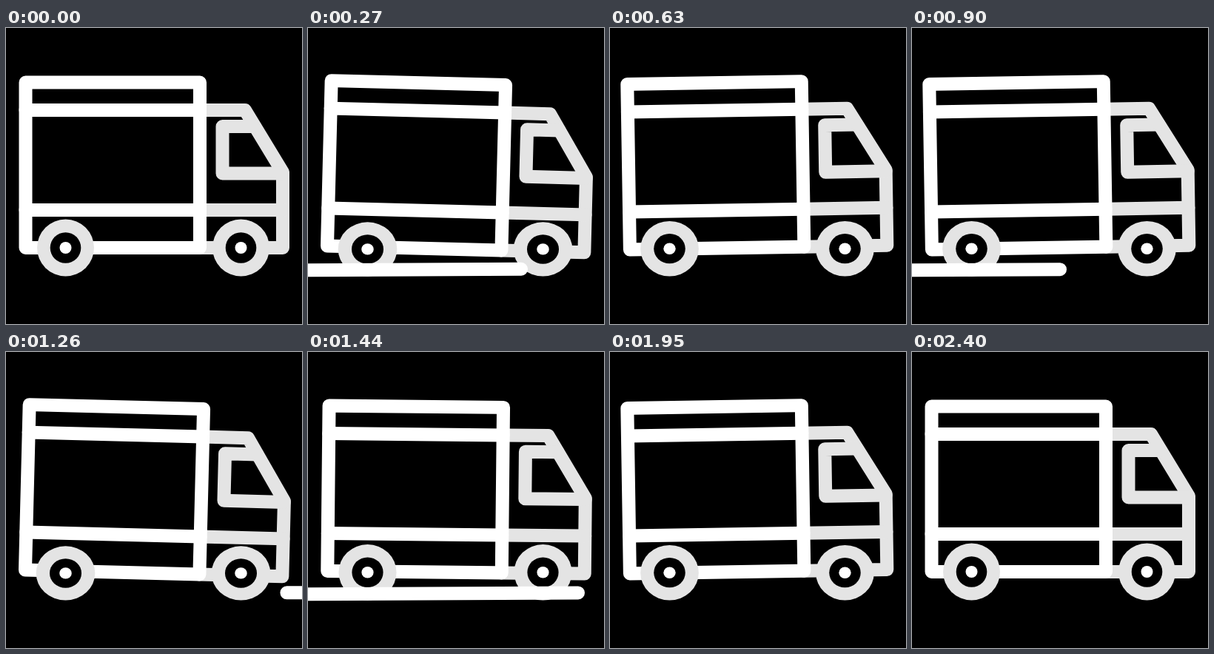
An HTML page with a canvas for the animation above (2430 ms loop, 400x400 px).

```html
<!DOCTYPE html>
<html lang="en">
<head>
<meta charset="utf-8">
<title>Delivery truck</title>
<style>
  html, body { margin: 0; width: 100%; height: 100%; overflow: hidden; background: #000; }
  canvas { display: block; width: 100vmin; height: 100vmin; }
</style>
</head>
<body>
<canvas id="stage" width="400" height="400"></canvas>
<script>
const ctx = document.getElementById('stage').getContext('2d');
const LOOP = 2430, STEP = 30;
const WHITE = '#fff', GREY = '#e4e4e4', BLACK = '#000';
const TILT = 1.45;
const SWING_START = 270, SWING = 495, SWING_END = SWING_START + 3 * SWING;
const LINE_PERIOD = 600, LINE_COUNT = 3;

const progress = (t, from, to) => Math.min(1, Math.max(0, (t - from) / (to - from)));
const ease = (t, from, to) => {
  const u = progress(t, from, to);
  return u * u * (3 - 2 * u);
};

// Rocking angle in degrees: four alternating peaks, then a slow settle.
function tiltAt(t) {
  if (t < SWING_START) return TILT * ease(t, 0, SWING_START);
  if (t < SWING_END) {
    const n = Math.floor((t - SWING_START) / SWING);
    const start = SWING_START + n * SWING;
    const sign = n % 2 ? -1 : 1;
    return sign * TILT * (1 - 2 * ease(t, start, start + SWING));
  }
  return -TILT * (1 - ease(t, SWING_END, 2415)) ** 2;
}

function stroke(color, points, closed = false) {
  ctx.beginPath();
  points.forEach(([x, y]) => ctx.lineTo(x, y));
  if (closed) ctx.closePath();
  ctx.strokeStyle = color;
  ctx.stroke();
}

function disc(color, radius) {
  ctx.beginPath();
  ctx.arc(0, 0, radius, 0, Math.PI * 2);
  ctx.fillStyle = color;
  ctx.fill();
}

function drawBody(tilt, load) {
  ctx.save();
  ctx.translate(150, 275 + 0.7 * load);
  ctx.rotate(tilt * Math.PI / 180);
  ctx.translate(-150, -275);
  // Cab
  stroke(GREY, [[262, 111], [323, 111], [374, 195], [374, 297], [262, 297]]);
  stroke(GREY, [[336, 133], [292.5, 133], [292.5, 196.5], [374, 196.5]]);
  stroke(GREY, [[262, 246], [374, 246]]);
  // Cargo box
  stroke(WHITE, [[26.5, 73.5], [262, 73.5], [262, 297], [26.5, 297]], true);
  stroke(WHITE, [[26.5, 111], [262, 111]]);
  stroke(WHITE, [[26.5, 246], [262, 246]]);
  ctx.restore();
}

// Wheels flatten against the ground as the body leans.
function drawWheel(x, load) {
  ctx.save();
  ctx.translate(x, 335.5);
  ctx.scale(1 + 0.035 * load, 1 - 0.05 * load);
  ctx.translate(0, -38.5);
  disc(GREY, 38.5);
  disc(BLACK, 20.8);
  disc(WHITE, 8);
  ctx.restore();
}

// A road streak sweeping from right to left, its tail following its head.
function drawRoadLine(t) {
  const head = ease(t, 0, 270), tail = ease(t, 180, 420);
  if (head <= 0 || tail >= 1) return;
  const point = p => [440 - 480 * p, 325 + 2.5 * p];
  stroke(WHITE, [point(tail), point(head)]);
}

function draw(t) {
  const tilt = tiltAt(t), load = Math.abs(tilt) / TILT;
  ctx.fillStyle = BLACK;
  ctx.fillRect(0, 0, 400, 400);
  ctx.lineWidth = 18;
  ctx.lineCap = ctx.lineJoin = 'round';
  drawBody(tilt, load);
  drawWheel(80.5, load);
  drawWheel(317.5, load);
  for (let i = 0; i < LINE_COUNT; i++) drawRoadLine(t - i * LINE_PERIOD);
}

const startTime = performance.now();
function tick() {
  const t = (performance.now() - startTime) % LOOP;
  draw(Math.floor(t / STEP) * STEP);
  requestAnimationFrame(tick);
}
tick();
</script>
</body>
</html>
```
